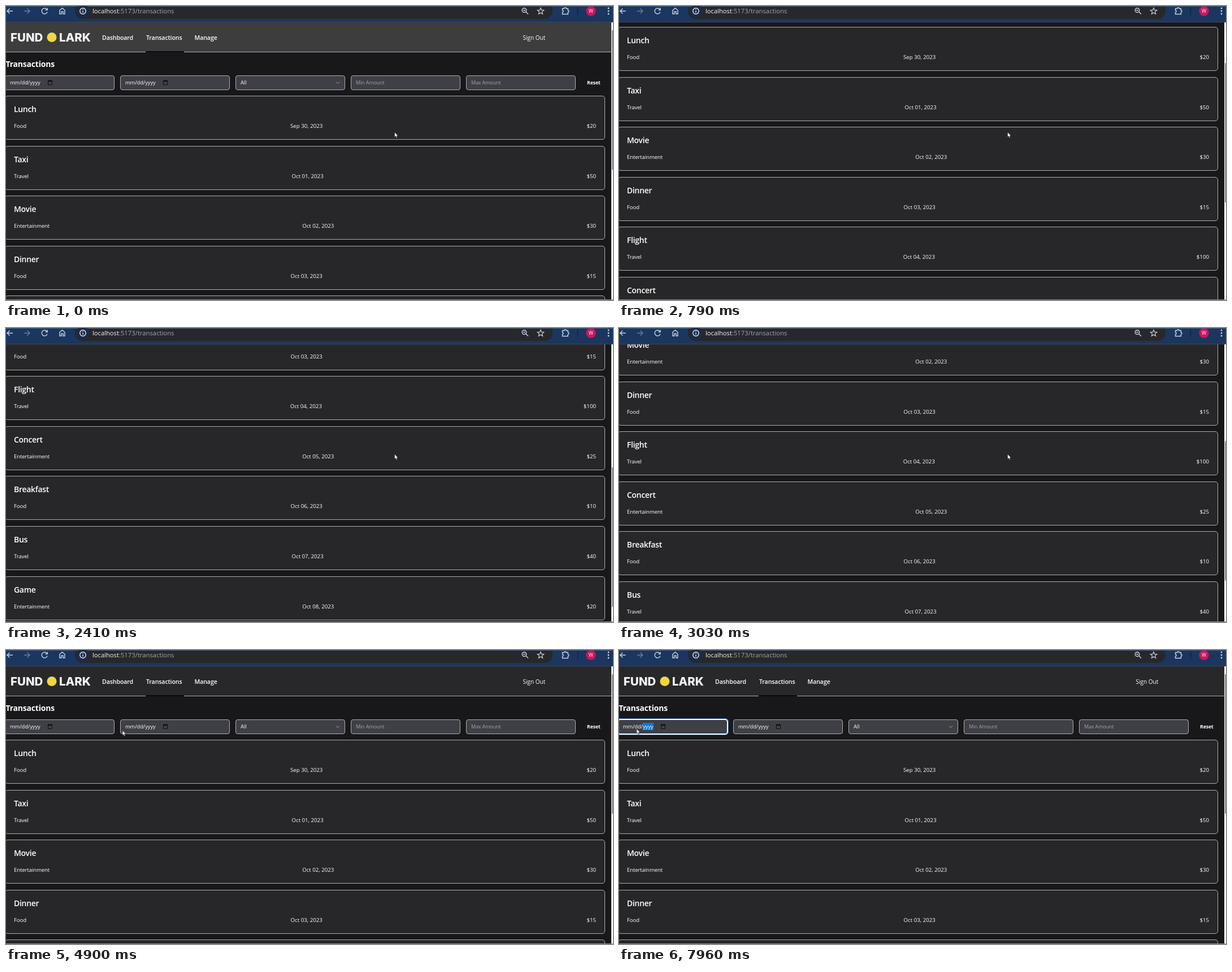
Animation, 1074 px wide and 521 px high, one loop 8000 ms. Source, as an HTML page:

```html
<!DOCTYPE html>
<html lang="en">
<head>
<meta charset="utf-8">
<title>Transactions</title>
<style>
@property --scroll { syntax: "<number>"; inherits: true; initial-value: 0; }
@property --focus { syntax: "<number>"; inherits: true; initial-value: 0; }

html, body { margin: 0; width: 100%; height: 100%; overflow: hidden; background: #18181b; }
.stage {
  --line: #aeaeb1;
  position: relative; width: 1074px; height: 521px; overflow: hidden;
  background: #18181b; color: #fff; font: 500 9.7px/20px "Open Sans", "Noto Sans", sans-serif;
  animation: scroll 8s step-end infinite, focus 8s step-end infinite;
}
.stage * { box-sizing: border-box; }
.abs, .page, .bar, .input, .card, .cursor { position: absolute; white-space: nowrap; }

/* Browser toolbar */
.bar { left: 0; top: 0; width: 1074px; height: 29px; background: #1b365f; border-bottom: 1px solid #35496a; }
.bar svg { position: absolute; left: 0; top: 0; }
.url { left: 153px; top: -1px; font-size: 11.3px; font-weight: 400; color: #a3a6aa; }
.url b { font-weight: 500; color: #f1f3f4; letter-spacing: -.05px; }

/* Page */
.page { left: 0; top: 0; width: 1071px; height: 1000px; transform: translateY(calc(var(--scroll) * -1px)); }
.header {
  left: 0; top: 0; width: 1071px; height: 82px; border-bottom: 1px solid var(--line);
  background: #28282a; animation: header 8s step-end infinite;
}
.tab { left: 247px; top: 80px; width: 68px; height: 2px; background: #09090b; }
.nav { top: 46px; font-size: 10.6px; font-weight: 600; letter-spacing: -.1px; }
.logo { left: 0; top: 29px; }
h1 { margin: 0; left: -.5px; top: 93px; font-size: 14px; font-weight: 700; letter-spacing: -.2px; }

.input {
  top: 123px; width: 194px; height: 26px; padding-left: 8px; line-height: 24px; font-size: 9.3px;
  background: #3f3f46; border: 1px solid var(--line); border-radius: 4px; letter-spacing: -.05px;
}
.hint { color: #a1a1aa; font-size: 9px; font-weight: 400; letter-spacing: -.15px; }
.input svg { position: absolute; top: 7px; }
.ring {
  left: -2px; top: 123px; width: 194px; height: 26px; border: 1px solid #fff; border-radius: 4px;
  box-shadow: 0 0 0 1px #fff, 0 0 0 2px #23539c; opacity: var(--focus);
}
.year { position: relative; z-index: 0; }
.year::before {
  content: ""; position: absolute; z-index: -1; inset: 0; background: #0b78d8; opacity: var(--focus);
}

.card {
  left: -2px; width: 1062px; height: 78px; padding: 13px 15px 0;
  background: #27272a; border: 1px solid var(--line); border-radius: 5px;
}
.card h2 { margin: 0; font-size: 14px; font-weight: 600; line-height: 20px; letter-spacing: -.3px; }
.row { display: flex; justify-content: space-between; margin-top: 10px; }
.row :first-child { letter-spacing: -.16px; }

/* Scrollbar, window edge, pointer */
.track { left: 1071px; top: 29px; width: 3px; height: 492px; background: #fafafa; }
.thumb {
  left: 1072px; top: 43px; width: 2px; height: 247px; background: #8b8b8b;
  transform: translateY(calc(var(--scroll) * .477px));
}
.edge { left: 0; top: 520px; width: 1074px; height: 1px; background: #8b8b8d; }
.cursor { left: 0; top: 0; width: 8px; height: 12px; animation: cursor 8s step-end infinite; }

@keyframes scroll {
  0% { --scroll: 0; }
  6.25% { --scroll: 75; }
  9.875% { --scroll: 122; }
  12.75% { --scroll: 131; }
  16.25% { --scroll: 163; }
  19.75% { --scroll: 173; }
  22.625% { --scroll: 270; }
  25.875% { --scroll: 349; }
  30.125% { --scroll: 428; }
  33.875% { --scroll: 459; }
  37.875% { --scroll: 330; }
  42% { --scroll: 180; }
  46% { --scroll: 35; }
  50%, 100% { --scroll: 0; }
}
@keyframes focus {
  0% { --focus: 0; }
  79.875%, 100% { --focus: 1; }
}
@keyframes header {
  0% { background: #3d3d3e; }
  6.25%, 100% { background: #28282a; }
}
@keyframes cursor {
  0% { transform: translate(687px, 223px); }
  55.25% { transform: translate(508px, 226px); }
  58.375% { transform: translate(234px, 134px); }
  61.25% { transform: translate(205.5px, 142px); animation-timing-function: steps(11); }
  69.625% { transform: translate(92px, 140px); }
  73.75% { transform: translate(74px, 140px); }
  74.5% { transform: translate(55px, 139px); }
  89.625% { transform: translate(64px, 139px); animation-timing-function: steps(3); }
  91.875% { transform: translate(87px, 138px); }
  98% { transform: translate(70px, 139px); animation-timing-function: steps(2); }
  99.5%, 100% { transform: translate(30.5px, 139px); }
}
</style>
</head>
<body>
<div class="stage">
  <div class="page">
    <div class="abs header"></div>
    <div class="abs tab"></div>
    <svg class="abs logo" width="160" height="52" fill="#f4f4f5" font-family="Inter, sans-serif" font-weight="800" font-size="20.5">
      <text x="8" y="34">FUND</text>
      <circle cx="81" cy="26.500" r="8.500" fill="#f2d541"/>
      <text x="150" y="34" text-anchor="end">LARK</text>
    </svg>
    <div class="abs nav" style="left:170px">Dashboard</div>
    <div class="abs nav" style="left:248px">Transactions</div>
    <div class="abs nav" style="left:333.5px">Manage</div>
    <div class="abs" style="left:914.5px;top:46px;font-size:10px">Sign Out</div>
    <h1 class="abs">Transactions</h1>

    <div class="input" style="left:-2px">mm/dd/<span class="year">yyyy</span></div>
    <div class="input" style="left:202px">mm/dd/yyyy</div>
    <div class="input" style="left:406px">All
      <svg style="left:175px" width="10" height="10" fill="none" stroke="#a1a1aa"><path d="M2 3.5 5 6.5 8 3.5"/></svg>
    </div>
    <div class="input hint" style="left:610px">Min Amount</div>
    <div class="input hint" style="left:814px">Max Amount</div>
    <svg class="abs" style="left:0;top:130px" width="300" height="12" fill="none" stroke="#0c0c0e">
      <g id="cal"><path d="M74.5 2.5h7v7h-7z"/><path d="M74 3h8" stroke-width="2"/><path d="M76 .8v1.5M80 .8v1.5"/></g>
      <use href="#cal" x="204"/>
    </svg>
    <div class="abs ring"></div>
    <div class="abs" style="left:1028px;top:126px;font-size:8.7px;font-weight:700;letter-spacing:-.1px">Reset</div>
  </div>

  <div class="abs track"></div>
  <div class="abs thumb"></div>

  <div class="bar">
    <svg width="1074" height="28" fill="none" stroke="#c9d3e2" stroke-width="1.4">
      <path d="M0 .5H1074" stroke="#4b6182" stroke-width="1"/>
      <path d="M122 1H967V9a14 14 0 0 1-14 14H136a14 14 0 0 1-14-14z" fill="#28282a" stroke="none"/>
      <path d="M12 9H2M6.500 4.500 2 9l4.500 4.500"/>
      <path d="M32 9h10M37.500 4.500 42 9l-4.500 4.500" stroke="#67809f"/>
      <path d="M72.600 6.500A5 5 0 1 0 73 10.500M73.200 3.500v3.600h-3.600"/>
      <path d="M95 7.500 99.500 3.700 104 7.500V14h-3v-4h-3v4h-3z"/>
      <circle cx="136" cy="9" r="11.500" fill="#1b2c47" stroke="none"/>
      <circle cx="136" cy="9" r="5.200" stroke="#e8eaed"/>
      <path d="M136 8.300v3.500M136 5.700v1.400" stroke="#e8eaed"/>
      <circle cx="917" cy="7.500" r="3.800"/>
      <path d="M919.800 10.300 924 14.500M915 7.500h4"/>
      <path id="star" stroke-width="1.200"/>
      <path d="M984.500 4.500h3.200a1.700 1.700 0 0 1 3.400 0h3.200v3.300a1.700 1.700 0 0 1 0 3.400v3.300h-9.800v-3.300a1.700 1.700 0 0 0 0-3.400z"/>
      <path d="M1011.500 2v14" stroke="#0f2342"/>
      <circle cx="1035" cy="9" r="8.700" fill="#c8175d" stroke="none"/>
      <g fill="#c9d3e2" stroke="none"><circle cx="1066" cy="4" r="1.400"/><circle cx="1066" cy="9" r="1.400"/><circle cx="1066" cy="14" r="1.400"/></g>
    </svg>
    <div class="abs url"><b>localhost</b>:5173/transactions</div>
    <div class="abs" style="left:1025px;top:-1px;width:20px;text-align:center;font-size:8.5px">W</div>
  </div>

  <div class="abs edge"></div>
  <svg class="cursor" viewBox="0 0 8 12"><path d="M.5.5V9.300L2.500 7.600 3.900 10.700 5.400 10 4.100 7H6.700z" fill="#fff" stroke="#111" stroke-width=".6"/></svg>
</div>

<script>
const PITCH = 88.57;
const items = [
  ["Lunch", "Food", 20], ["Taxi", "Travel", 50], ["Movie", "Entertainment", 30],
  ["Dinner", "Food", 15], ["Flight", "Travel", 100], ["Concert", "Entertainment", 25],
  ["Breakfast", "Food", 10], ["Bus", "Travel", 40], ["Game", "Entertainment", 20]
];
const page = document.querySelector(".page");

items.forEach(([title, kind, price], i) => {
  const day = i ? `Oct 0${i}` : "Sep 30";
  const top = Math.round(159 + PITCH * i);
  page.insertAdjacentHTML("beforeend", `<div class="card" style="top:${top}px"><h2>${title}</h2>
    <div class="row"><span>${kind}</span><span>${day}, 2023</span><span>$${price}</span></div></div>`);
});

const points = Array.from({ length: 10 }, (_, i) => {
  const r = i % 2 ? 2.6 : 6, a = (i / 5 - .5) * Math.PI;
  return `${946 + r * Math.cos(a)} ${9.3 + r * Math.sin(a)}`;
});
document.getElementById("star").setAttribute("d", `M${points.join("L")}z`);
</script>
</body>
</html>
```
